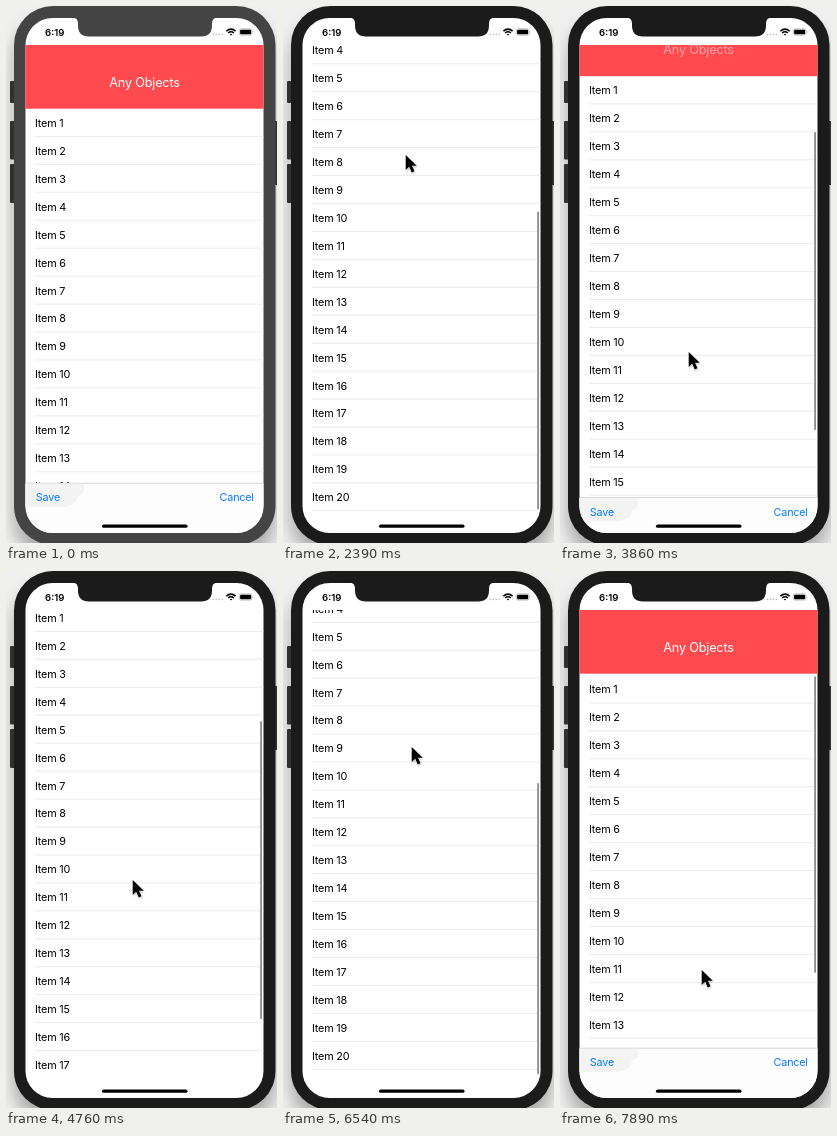
Animation of 271x537 px, one loop 8000 ms. Source, as an HTML page:

```html
<!DOCTYPE html>
<html lang="en">
<head>
<meta charset="utf-8">
<title>Collapsing header</title>
<style>
  html, body { margin: 0; width: 100%; height: 100%; overflow: hidden; background: #f0f0f0; }
  svg { display: block; width: 100%; height: 100%; }
  text { font: 10.8px Inter, Roboto, sans-serif; letter-spacing: -.2px; }
  #title { font-size: 12.7px; fill: #fff; text-anchor: middle; }
  .action { fill: #087cff; }
  .clock { font-size: 9.6px; font-weight: 600; letter-spacing: 0; }
  #phone { fill: #444; }
  #phone.active { fill: #1b1b1b; }
  #rows line { stroke: #e6e6e6; stroke-width: .8; }
</style>
</head>
<body>
<svg viewBox="0 0 271 537" preserveAspectRatio="none">
  <defs>
    <clipPath id="screenClip"><rect x="19.5" y="12" width="238" height="515" rx="27"/></clipPath>
    <clipPath id="listClip"><rect x="19" y="39" width="239" height="466.5"/></clipPath>
    <filter id="blur" x="-20%" y="-20%" width="140%" height="140%"><feGaussianBlur stdDeviation="9"/></filter>
    <filter id="soft"><feGaussianBlur stdDeviation="1"/></filter>
  </defs>
  <rect width="271" height="537" fill="#f0f0f0"/>
  <rect x="8" y="14" width="261" height="540" rx="40" opacity=".3" filter="url(#blur)"/>

  <g id="phone">
    <g fill="#303030">
      <rect x="4" y="75" width="5" height="22" rx="1"/>
      <rect x="4" y="115" width="5" height="38.5" rx="1"/>
      <rect x="4" y="158" width="5" height="39" rx="1"/>
      <rect x="268" y="115" width="4" height="64"/>
    </g>
    <rect x="8" y="0" width="261.5" height="539" rx="39"/>
    <rect x="19.5" y="12" width="238" height="515" rx="27" fill="#fff"/>
    <path d="M66 11.5h146q-6 0-6 6v2q0 11-11 11H83q-11 0-11-11v-2q0-6-6-6Z"/>
  </g>

  <g clip-path="url(#screenClip)">
    <g clip-path="url(#listClip)">
      <g id="rows"></g>
      <g id="header">
        <rect x="19" y="20" width="239" height="82.7" fill="#ff4a50"/>
        <text id="title" x="138.5" y="80.5">Any Objects</text>
      </g>
    </g>
    <g id="toolbar">
      <rect x="19" y="477" width="239" height="80" fill="#fdfdfd"/>
      <path d="M19 478h59q2 9-6 12-1 9-14 11H19Z" fill="#f3f3f3"/>
      <path d="M19 477.2h239" stroke="#cfcfcf" stroke-width=".8"/>
      <text class="action" x="29.8" y="495.3">Save</text>
      <text class="action" x="247.8" y="495.3" text-anchor="end">Cancel</text>
    </g>
  </g>
  <rect id="thumb" x="254.2" width="1.8" rx=".9" fill="#8d8d8d"/>

  <text class="clock" x="39" y="29.5">6:19</text>
  <g id="dots" fill="#c4c4c4"></g>
  <g fill="none" stroke="#000" stroke-width="1.5">
    <path d="M220.4 25.1q4.6-3.9 9.2 0M222.1 27q2.9-2.3 5.8 0"/>
    <path d="M225 29.6l-1.3-1.4q1.3-.9 2.6 0Z" fill="#000" stroke="none"/>
  </g>
  <rect x="233.3" y="22.9" width="12.6" height="6.2" rx="1.7" fill="none" stroke="#999" stroke-width=".6"/>
  <rect x="234.1" y="23.7" width="11" height="4.6" rx="1"/>
  <path d="M246.8 24.8q1.2 1.2 0 2.4Z" fill="#888"/>
  <rect x="96" y="518.6" width="85.5" height="3.2" rx="1.6"/>

  <g id="cursor">
    <path d="M0 0v15l3.5-3.2 2.5 5.7 2.8-1.2-2.5-5.5h4.8Z" transform="translate(.6 1.2)" opacity=".3" filter="url(#soft)"/>
    <path d="M0 0v15l3.5-3.2 2.5 5.7 2.8-1.2-2.5-5.5h4.8Z" stroke="#fff" stroke-width="1" paint-order="stroke"/>
  </g>
</svg>
<script>
const LOOP = 8000, START = 298, STEP = 148.4;
const ROW = 27.94, LIST_TOP = 102.5, HEADER = 63.5, MAX_SCROLL = 156.5;
const THUMB_TOP = 105.3, THUMB_LENGTH = 298, BAR_TRAVEL = 28;

// step, scroll offset, pointer x, pointer y
const drag = [
  [0, 0, 118, 353], [6, 73, 118, 280], [9, 152, 120, 201], [11, 170, 122, 153],
  [13, 158, 122, 149], [14, 156.5, 122, 149], [15, 145, 122, 161],
  [17, 66, 124, 240], [18, -5, 126, 318], [20, -24, 128, 378], [22, 0, 128, 378],
  [24, 32.5, 128, 346], [29, 62, 126, 317], [30, 70, 126, 309],
  [37, 150, 127, 229], [40, 167, 128, 180], [42, 163, 128, 176], [44, 157, 128, 176],
  [45, 143, 129, 190], [47, 40, 132, 300], [48, -20, 136, 440],
  [49, -44, 139, 522], [50, -12, 141, 455], [51, -1.5, 141, 399]
];

const $ = id => document.getElementById(id);
const clamp = (v, lo, hi) => Math.min(hi, Math.max(lo, v));
const shift = (el, x, y) => el.setAttribute('transform', `translate(${x} ${y})`);
const show = (el, on) => { el.style.display = on ? '' : 'none'; };

$('rows').innerHTML = Array.from({ length: 20 }, (_, i) => {
  const top = LIST_TOP + i * ROW;
  return `<text x="29" y="${top + 18.4}">Item ${i + 1}</text>
    <line x1="29" x2="258" y1="${top + ROW}" y2="${top + ROW}"/>`;
}).join('');
$('dots').innerHTML = [0, 1, 2, 3].map(i =>
  `<circle cx="${207.3 + i * 3}" cy="28.3" r=".9"/>`).join('');

function poseAt(step) {
  const next = drag.findIndex(k => k[0] >= step);
  if (next <= 0) return drag[0].slice(1);
  const a = drag[next - 1], b = drag[next];
  const p = (step - a[0]) / (b[0] - a[0]);
  return a.slice(1).map((v, i) => v + (b[i + 1] - v) * p);
}

function render(time) {
  const active = time >= START;
  const step = clamp(Math.floor((time - START) / STEP), 0, 51);
  const [scroll, x, y] = poseAt(step);
  const folded = clamp(scroll, 0, HEADER);
  const open = folded < HEADER;
  const inside = clamp(scroll, 0, MAX_SCROLL);
  const over = scroll - inside;

  $('phone').classList.toggle('active', active);
  shift($('rows'), 0, -scroll);
  shift($('header'), 0, -folded);
  $('title').style.opacity = 1 - folded / HEADER;
  shift($('toolbar'), 0, folded / HEADER * BAR_TRAVEL);
  show($('header'), open);
  show($('toolbar'), open);

  const thumb = $('thumb');
  thumb.setAttribute('y', THUMB_TOP + inside * .64 + Math.max(0, over));
  thumb.setAttribute('height', THUMB_LENGTH - Math.abs(over));
  show(thumb, active && step > 0);
  show($('cursor'), active);
  shift($('cursor'), x + .7, y);
}

const begin = performance.now();
function tick() {
  render((performance.now() - begin) % LOOP);
  requestAnimationFrame(tick);
}
tick();
</script>
</body>
</html>
```
